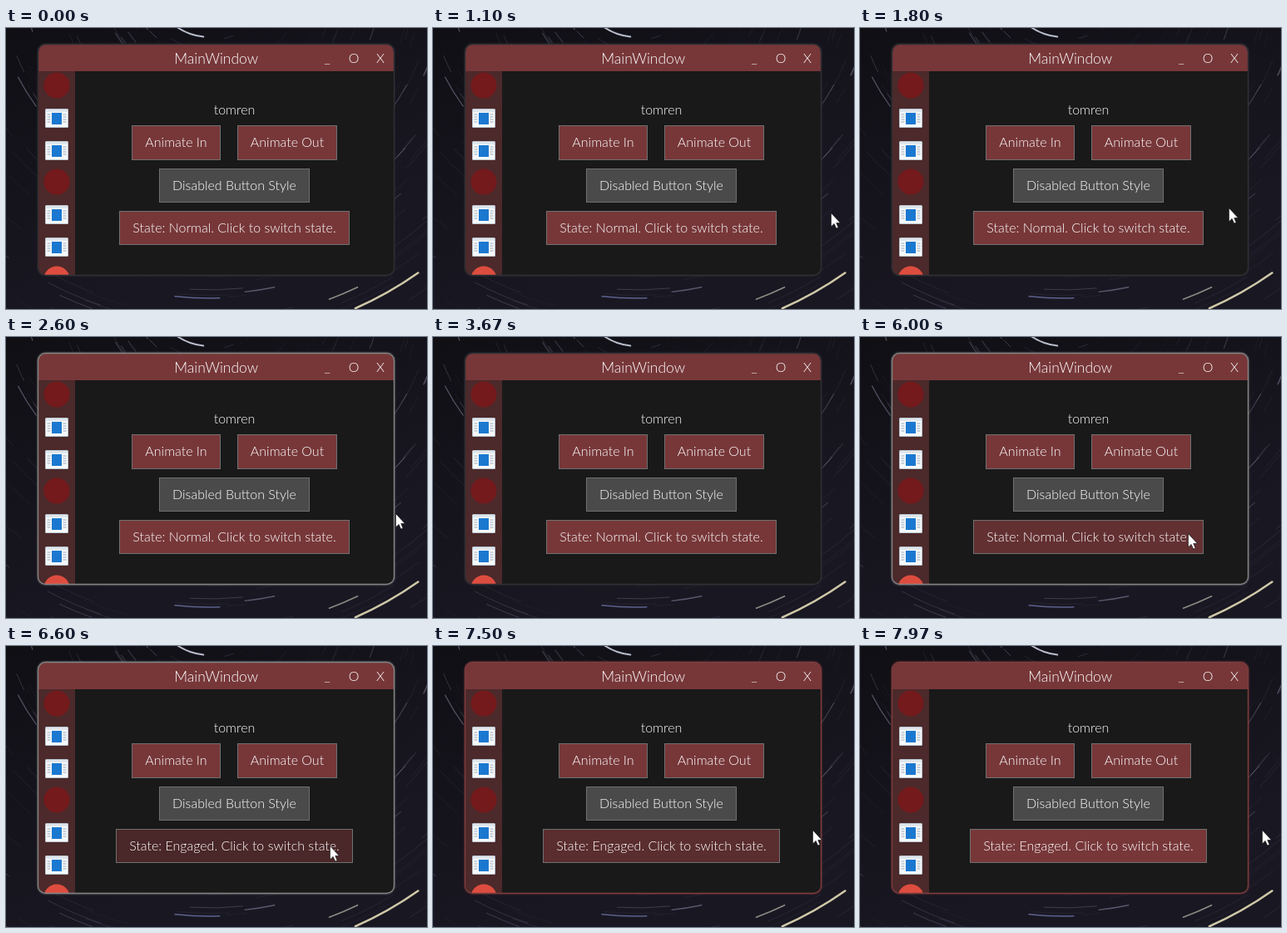
These frames come from a looping animation (506x338 px, 8 s). An HTML page with a canvas:

```html
<!DOCTYPE html>
<html lang="en">
<head>
<meta charset="utf-8">
<title>MainWindow</title>
<style>
  html, body { margin: 0; width: 100%; height: 100%; overflow: hidden; background: #111017; }
  canvas, svg { position: absolute; left: 0; top: 0; display: block; }
  text { font: 300 16px Lato, "Open Sans", sans-serif; fill: #fff; text-anchor: middle; }
  .title { font-size: 17.5px; }
  .btn rect { fill: #773739; stroke: #707070; }
  .btn.off rect { fill: #4a4a4a; }
  .edge { fill: none; }
</style>
</head>
<body>
<canvas id="sky" width="506" height="338"></canvas>
<svg width="506" height="338" viewBox="0 0 506 338">
  <defs>
    <clipPath id="frame"><rect x="39" y="20" width="427" height="277" rx="8.5"/></clipPath>
    <g id="app">
      <rect x="-14" y="-11" width="28" height="23" rx="1.5" fill="#b9c4cd"/>
      <rect x="-13" y="-7" width="26" height="18" fill="#f6f8fa"/>
      <rect x="-13" y="-10" width="26" height="3" fill="#dfe6ec"/>
      <rect x="-6" y="-6" width="12" height="14" fill="#1b78d0"/>
      <path d="M-11.5 -4h4m-4 3h4m-4 3h4m-4 3h4M7.5 -4h4m-4 3h4m-4 3h4m-4 3h4" stroke="#9aabb9"/>
    </g>
  </defs>
  <rect class="edge" x="38.5" y="19.5" width="428" height="278" rx="9" stroke-width="4" stroke-opacity=".22"/>
  <g clip-path="url(#frame)">
    <rect x="39" y="20" width="427" height="277" fill="#191919"/>
    <rect x="39" y="52" width="44" height="245" fill="#4c292a"/>
    <g id="icons"></g>
    <rect x="39" y="20" width="427" height="32" fill="#773739"/>
  </g>
  <rect class="edge" x="38.5" y="19.5" width="428" height="278" rx="9" stroke-width="1.4"/>
  <text class="title" x="252.7" y="43">MainWindow</text>
  <text x="386" y="42">_</text>
  <text x="418" y="42">O</text>
  <text x="450" y="42">X</text>
  <text x="274.5" y="104">tomren</text>
  <g id="buttons"></g>
  <path id="cursor" d="M.4 .4V17L4.1 13.4L6.6 19.1L9.2 18L6.8 12.4H11.6Z" fill="#fff" stroke="#111" stroke-width=".7"/>
</svg>
<script>
const LOOP = 8000;
const $ = id => document.getElementById(id);

function add(parent, tag, attrs) {
  const el = document.createElementNS('http://www.w3.org/2000/svg', tag);
  for (const k in attrs) el.setAttribute(k, attrs[k]);
  return parent.appendChild(el);
}

function button(cx, y, w, h, label, kind = '') {
  const g = add($('buttons'), 'g', { class: 'btn ' + kind });
  add(g, 'rect', { x: cx - w / 2, y, width: w, height: h });
  add(g, 'text', { x: cx, y: y + 25.5 }).textContent = label;
  return g;
}

button(204.5, 117.5, 106, 41, 'Animate In');
button(338, 117.5, 119, 41, 'Animate Out');
button(274.5, 169.5, 180, 40, 'Disabled Button Style', 'off');
const normal = button(274.5, 220.5, 276, 40, 'State: Normal. Click to switch state.');
const engaged = button(274.5, 220.5, 284, 40, 'State: Engaged. Click to switch state.');

for (let i = 0; i < 7; i++) {
  const y = Math.round(69 + 38.8 * i);
  if (i % 3) add($('icons'), 'use', { href: '#app', x: 61, y });
  else add($('icons'), 'circle', { cx: 61, cy: y, r: 15.5, fill: i < 6 ? '#741a1c' : '#dd4d3f' });
}

// Star trails: arcs round a pole above the stage.
function drawSky() {
  const c = $('sky').getContext('2d');
  const bg = c.createLinearGradient(0, 0, 120, 338);
  bg.addColorStop(0, '#100f14');
  bg.addColorStop(1, '#191722');
  c.fillStyle = bg;
  c.fillRect(0, 0, 506, 338);
  c.lineCap = 'round';

  const trail = (r, mid, span, width, color) => {
    c.strokeStyle = color;
    c.lineWidth = width;
    c.beginPath();
    c.arc(245, -60, r, mid - span, mid + span);
    c.stroke();
  };
  let seed = 41;
  const rnd = () => (seed = (seed * 16807) % 2147483647) / 2147483647;
  for (let i = 0; i < 420; i++) {
    const glow = .06 + .42 * rnd() ** 4;
    trail(60 + rnd() * 410, rnd() * Math.PI, .02 + rnd() * .07, .6 + rnd() * .8, `rgba(160,160,190,${glow})`);
  }
  trail(434, 1.056, .1, 2.6, '#cfc8a8');
  trail(412, 1.17, .045, 1.5, '#8f8c85');
  trail(385, 1.61, .07, 1.4, '#5c628c');
  trail(71, 1.92, .24, 2, '#b9bdcc');
}
drawSky();

const ramp = (t, a, b) => Math.min(1, Math.max(0, (t - a) / (b - a)));
const mix = (a, b, k) => a + (b - a) * k;
const blend = (a, b, k) => a.map((v, i) => mix(v, b[i], k));
const rgb = c => `rgb(${c.map(Math.round)})`;

// bend is the height of the curve's middle point, pow the strength of the ease-out.
const trips = [
  { start: 1000, end: 1470, from: [500, 226], to: [443, 216], bend: 220, pow: 2 },
  { start: 2430, end: 2870, from: [443, 216], to: [507, 219], bend: 207, pow: 1 },
  { start: 4470, end: 4730, from: [497, 207], to: [439, 197], bend: 201, pow: 2 },
  { start: 5730, end: 6130, from: [439, 197], to: [389, 240], bend: 220, pow: 2 },
  { start: 7370, end: 7970, from: [389, 240], to: [483, 221], bend: 217, pow: 5 }
];

function cursorAt(t) {
  const trip = trips.filter(m => m.start <= t).pop();
  if (!trip) return [520, 0];
  const { start, end, from, to, bend, pow } = trip;
  const k = 1 - (1 - ramp(t, start, end)) ** pow;
  const mid = [(from[0] + to[0]) / 2, bend];
  return blend(blend(from, mid, k), blend(mid, to, k), k);
}

const dim = [48, 48, 53], lit = [133, 133, 133], red = [128, 60, 62];
const idle = [119, 55, 57], hover = [74, 39, 40];
const edges = document.querySelectorAll('.edge');
const CLICK = 6600;

function draw(now) {
  const t = now % LOOP;

  const focus = ramp(t, 1800, 2030) - ramp(t, 3430, 3670) + ramp(t, 5170, 5430);
  const edge = rgb(blend(blend(dim, lit, focus), red, ramp(t, CLICK, 6900)));
  edges.forEach(el => el.style.stroke = edge);

  const over = ramp(t, 5900, 6130) - ramp(t, 7420, 7650);
  for (const g of [normal, engaged]) g.firstChild.style.fill = rgb(blend(idle, hover, over));
  normal.style.display = t < CLICK ? '' : 'none';
  engaged.style.display = t < CLICK ? 'none' : '';

  $('cursor').setAttribute('transform', `translate(${cursorAt(t).map(Math.round)})`);
}

function tick() {
  draw(performance.now());
  requestAnimationFrame(tick);
}
tick();
</script>
</body>
</html>
```
